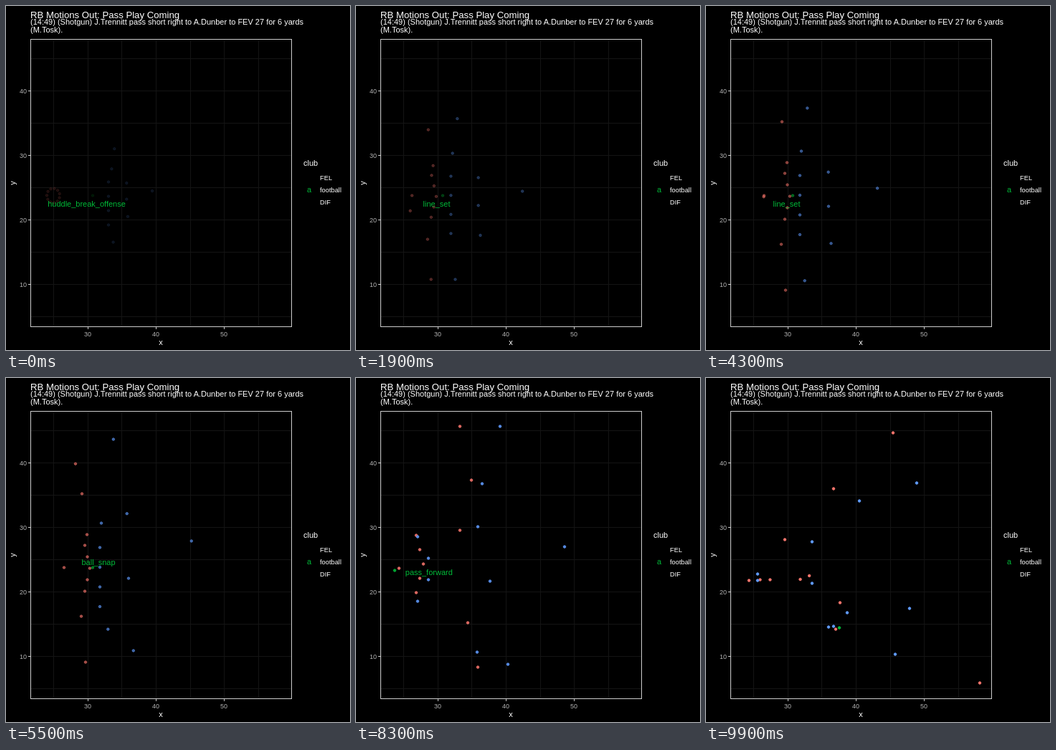
An HTML page for the animation above (10000 ms loop, 480 px wide and 480 px high).

```html
<!DOCTYPE html>
<html lang="en">
<head>
<meta charset="utf-8">
<title>RB Motions Out</title>
<style>
  html, body { margin: 0; width: 100%; height: 100%; overflow: hidden; background: #000; }
  svg { display: block; width: 480px; height: 480px; }
  text { font: 11px "Liberation Sans", Arial, sans-serif; fill: #fff; }
  .title { font-size: 13.2px; }
  .tick { font-size: 9px; fill: #b3b3b3; }
  .key { font-size: 9.3px; }
  .mid { text-anchor: middle; }
  .end { text-anchor: end; }
  .event { fill: #00ba38; text-anchor: middle; }
</style>
</head>
<body>
<svg viewBox="0 0 480 480">
  <text class="title" x="34" y="17">RB Motions Out: Pass Play Coming</text>
  <text x="34" y="26">(14:49) (Shotgun) J.Trennitt pass short right to A.Dunber to FEV 27 for 6 yards</text>
  <text x="34" y="37">(M.Tosk).</text>
  <g id="axes"></g>
  <text class="mid" x="216" y="473">x</text>
  <text class="mid" transform="translate(13 247) rotate(-90)">y</text>
  <text x="415" y="223">club</text>
  <text class="key" x="438" y="243">FEL</text>
  <text class="key" x="438" y="260">football</text>
  <text class="key" x="438" y="277">DIF</text>
  <text class="event" x="423" y="260">a</text>
  <g id="dots" transform="translate(0 -.5)"></g>
  <text class="event" id="event"></text>
</svg>
<script>
const LOOP = 10000, STEP = 100, LAST = LOOP - STEP;
const SET = 2900, SHIFT = 3800, SHIFTED = 6300, SNAP = 7500, CAUGHT = 9550, THROW = 8900;
const RED = '#f8766d', BLUE = '#619cff', GREEN = '#00ba38';
const $ = id => document.getElementById(id);

function add(parent, tag, attrs, text = '') {
  const el = document.createElementNS('http://www.w3.org/2000/svg', tag);
  for (const name in attrs) el.setAttribute(name, attrs[name]);
  el.textContent = text;
  return parent.appendChild(el);
}

// Grid, ticks and panel border
const axes = $('axes');
const line = (d, stroke) => add(axes, 'path', { d, stroke });
for (let i = 0; i < 7; i++) {
  const x = Math.floor(66.6 + i * 47.6) + .5;
  line(`M${x} 47V447`, '#141414');
  if (i % 2) {
    line(`M${x} 448v3`, '#ccc');
    add(axes, 'text', { class: 'tick mid', x: x - .5, y: 461 }, 25 + i * 5);
  }
}
for (let i = 0; i < 9; i++) {
  const y = 433.5 - i * 45;
  line(`M35 ${y}H398`, '#141414');
  if (i % 2) {
    line(`M31 ${y}h3`, '#ccc');
    add(axes, 'text', { class: 'tick end', x: 29, y: y + 3.5 }, 5 + i * 5);
  }
}
add(axes, 'rect', { x: 34.5, y: 46.5, width: 364, height: 401, fill: 'none', stroke: '#ccc' });

// Motion helpers; points are [x, y]
const span = (t, from, to) => Math.min(1, Math.max(0, (t - from) / (to - from)));
const mix = (a, b, u) => a.map((v, i) => v + (b[i] - v) * u);
const shifted = ([x, y], dx, dy) => [x + dx, y + dy];
const smooth = u => u * u * (3 - 2 * u);
const easeOut = u => 1 - (1 - u) ** 2;
// Parabola that passes b at a third of the way from a to c
const bend = (a, b, c, u) => a.map((v, i) =>
  v * (1 - 3 * u) * (1 - u) + b[i] * 4.5 * u * (1 - u) + c[i] * u * (3 * u - 1) / 2);

const dots = [];
function track(color, at) {
  dots.push({ at, el: add($('dots'), 'circle', { r: 1.75, fill: color, stroke: color }) });
  return at;
}

// Walk to the set spot, shift before the snap, then run a route with one break
function player(color, start, set, cut, end, snap = set) {
  return track(color, t =>
    t < SET ? mix(start, set, easeOut(t / SET))
    : t < SNAP ? mix(set, snap, smooth(span(t, SHIFT, SHIFTED)))
    : bend(snap, cut, end, span(t, SNAP, LAST)));
}

// The offense leaves a round huddle, clockwise from the top
let seat = 0;
function offense(...route) {
  const a = -1.4 + seat++ * Math.PI * 2 / 11;
  return player(RED, [66 + 9 * Math.cos(a), 265 + 10 * Math.sin(a)], ...route);
}
// The defense spreads out from its middle
const defense = (set, ...route) => player(BLUE, mix(set, [165, 258], .45), set, ...route);

const tightEnd = offense([113, 219], [145, 213], [187, 314]);
for (let k = 0; k < 5; k++) {
  const side = k - 2, wing = Math.abs(side);
  offense([117 - 3.5 * wing, 266 + 16 * side],
    [94 - 5 * wing, 260 + 20 * side],
    [110 + 36 * Math.sin(1.25 * k), 282 - 56 * .1 ** k]);
}
const slot = offense([105, 333], [156, 342], [181, 351]);
const flanker = offense([111, 397], [170, 404], [382, 426]);
const passer = offense([81, 265], [60, 266], [60, 283]);
const back = offense([78, 290], [145, 68], [261, 77], [103, 66]);
const splitEnd = offense([106, 162], [161, 143], [178, 155]);

// Pass rush: the edges close on the passer, the inside is held up
for (let k = 0; k < 4; k++) {
  const edge = k % 3 === 0;
  player(BLUE, [143, 246 + 20 * k], [131, 237 + 27.5 * k], [edge ? 86 : 101, 222 + 30 * k],
    edge ? [72, 274 + 3 * k] : [148, 171 + 58 * k]);
}
// Linebackers, corners and safeties
defense([133, 203], [170, 208], [178, 347]);
defense([171, 280], [187, 284], [197, 328]);
defense([140, 152], [201, 68], [294, 147], [153, 65]);
defense([137, 389], [169, 383], [171, 348], [144, 339]);
defense([171, 239], [176, 148], [214, 172], [168, 174]);
defense([174, 324], [212, 400], [264, 386], [179, 399]);
defense([236, 259], [291, 236], [284, 322], [266, 218]);

// The ball is snapped to the passer, thrown and carried by the slot receiver
track(GREEN, t => {
  const held = mix([121, 265], shifted(passer(t), -6, 3), span(t, SNAP, SNAP + 300));
  return mix(held, shifted(slot(t), 5, -2), span(t, THROW, CAUGHT));
});

function drawEvent(t) {
  const label = t < 1300 ? 'huddle_break_offense'
    : t < 5000 ? 'line_set'
    : t < 8100 ? 'ball_snap'
    : t < 8800 ? 'pass_forward' : '';
  const below = t < 500 || label === 'line_set';
  const [x, y] = below ? [112.5, 280] : mix([129, 261], [78, 287], span(t, SNAP, SNAP + 1500));
  const el = $('event');
  el.textContent = label;
  el.setAttribute('x', x);
  el.setAttribute('y', y);
}

function draw(now) {
  const t = Math.floor(now % LOOP / STEP) * STEP;
  const alpha = .1 + .9 * t / LAST;
  for (const { at, el } of dots) {
    const [x, y] = at(t);
    el.setAttribute('cx', x);
    el.setAttribute('cy', y);
    el.setAttribute('fill-opacity', alpha);
    el.setAttribute('stroke-opacity', alpha);
  }
  drawEvent(t);
}

const start = performance.now();
function tick() {
  draw(performance.now() - start);
  requestAnimationFrame(tick);
}
tick();
</script>
</body>
</html>
```
